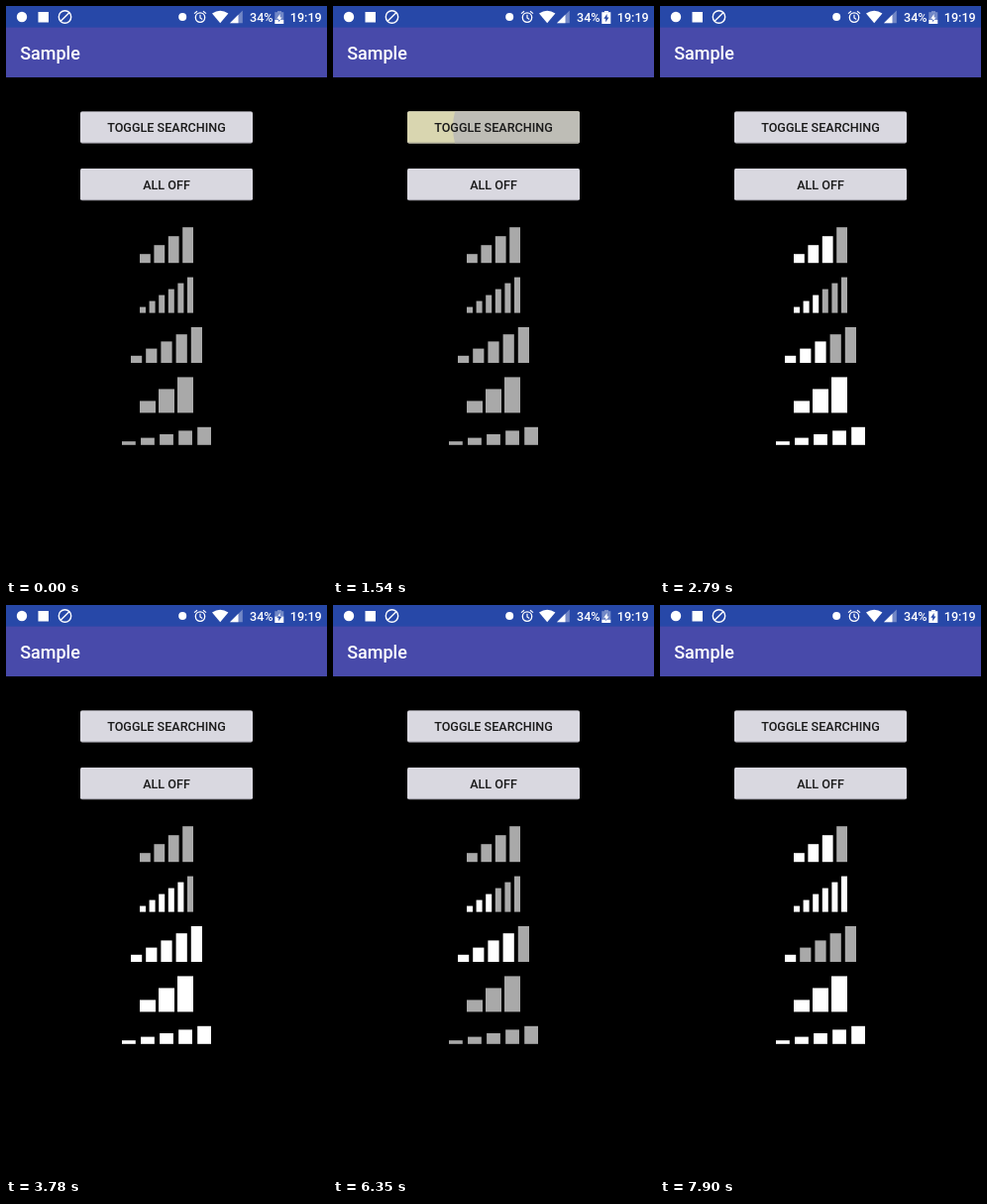
Write an HTML page with a canvas that moves like this. It is 324x576 px and loops after 8000 ms.

```html
<!DOCTYPE html>
<html lang="en">
<head>
<meta charset="utf-8">
<title>Sample</title>
<style>
  html, body { margin: 0; width: 100%; height: 100%; overflow: hidden; background: #000; }
  canvas { display: block; width: 324px; height: 576px; }
</style>
</head>
<body>
<canvas id="stage" width="324" height="576"></canvas>
<script>
const ctx = document.getElementById('stage').getContext('2d');
const LOOP = 8000;
const TICK = 512, FIRST_TICK = 1718;
const DIM = 'rgba(255,255,255,0.35)';

// x, top, width, height, bars, bar width, blinking
const METERS = [
  [135, 223.2, 54, 36, 4, 10.8, false],
  [135, 273.6, 54, 36, 6, 6, false],
  [126, 324, 72, 36, 5, 11.2, false],
  [135, 374.4, 54, 36, 3, 16, true],
  [117, 424.8, 90, 18, 5, 13.8, true]
];

// time, charge level
const CHARGE = [
  [0, .3], [170, .45], [690, .6], [1160, 1], [1720, 0], [2230, .15],
  [2750, .3], [3260, .4], [3780, .5], [4290, .58], [4590, 1], [5110, 0],
  [5660, .12], [6180, .25], [6690, .45], [7210, .6], [7720, 1]
];

const clamp = v => Math.max(0, Math.min(1, v));
const ramp = (t, a, b) => clamp((t - a) / (b - a));

function rect(x, y, w, h, fill) {
  ctx.fillStyle = fill;
  ctx.fillRect(x, y, w, h);
}

function poly(points, fill) {
  ctx.beginPath();
  points.forEach(([x, y]) => ctx.lineTo(x, y));
  ctx.closePath();
  ctx.fillStyle = fill;
  ctx.fill();
}

function disc(x, y, r, fill) {
  ctx.beginPath();
  ctx.arc(x, y, r, 0, Math.PI * 2);
  ctx.fillStyle = fill;
  ctx.fill();
}

function lines(width, ...paths) {
  ctx.beginPath();
  for (const path of paths) path.forEach(([x, y], i) => i ? ctx.lineTo(x, y) : ctx.moveTo(x, y));
  ctx.lineWidth = width;
  ctx.strokeStyle = '#fff';
  ctx.stroke();
}

function ring(x, y, r, width) {
  ctx.beginPath();
  ctx.arc(x, y, r, 0, Math.PI * 2);
  ctx.lineWidth = width;
  ctx.strokeStyle = '#fff';
  ctx.stroke();
}

function label(text, x, y, size, color, align = 'left') {
  ctx.font = `500 ${size}px Roboto, "Noto Sans", sans-serif`;
  ctx.textAlign = align;
  ctx.fillStyle = color;
  ctx.fillText(text, x, y);
}

function battery(t) {
  const level = CHARGE.filter(([at]) => at <= t).pop()[1];
  const top = 18 - 13 * level;
  const shell = fill => {
    rect(274, 5, 4, 1.5, fill);
    rect(271.3, 6.2, 9, 11.8, fill);
  };
  const bolt = fill => poly([[276.6, 8], [273.3, 12.8], [275.2, 12.8], [275.2, 16.2], [278.5, 11.4], [276.6, 11.4]], fill);
  const band = (y, h, draw) => {
    ctx.save();
    ctx.beginPath();
    ctx.rect(270, y, 12, h);
    ctx.clip();
    draw();
    ctx.restore();
  };
  band(4, top - 4, () => { shell(DIM); bolt('#fff'); });
  band(top, 18 - top, () => { shell('#fff'); bolt('#2748a8'); });
}

function statusBar(t) {
  rect(0, 0, 324, 21.6, '#2748a8');
  disc(16, 11, 5.2, '#fff');
  rect(32.5, 6, 10.5, 10.5, '#fff');

  ring(59.5, 11, 6.2, 1.4);
  lines(1.4, [[55.2, 15.3], [63.8, 6.7]]);

  disc(178.2, 11, 4, '#fff');

  ring(196, 11.6, 4.7, 1.3);
  lines(1.2, [[196, 8.8], [196, 12], [198.2, 13.4]], [[190, 7.6], [193, 5.2]], [[199, 5.2], [202, 7.6]]);

  ctx.beginPath();
  ctx.moveTo(216.2, 17.2);
  ctx.lineTo(208, 7.6);
  ctx.quadraticCurveTo(216.2, 2, 224.4, 7.6);
  ctx.closePath();
  ctx.fillStyle = '#fff';
  ctx.fill();

  poly([[226, 17.2], [238.8, 4.6], [238.8, 17.2]], DIM);
  poly([[226, 17.2], [234.5, 8.8], [234.5, 17.2]], '#fff');

  label('34%', 246, 15.6, 12.6, '#fff');
  battery(t);
  label('19:19', 286.8, 15.6, 12.6, '#fff');
}

function ripple(t) {
  const fade = 1 - ramp(t, 1690, 1940);
  const press = ramp(t, 1180, 1400) * fade;
  if (!press) return;
  ctx.globalAlpha = press;
  rect(75, 106, 174, 33, '#d9d6b0');
  const grow = ramp(t, 1330, 1800);
  ctx.globalAlpha = ramp(t, 1330, 1420) * fade;
  disc(196 - 22 * grow, 122.5, 145 * grow, '#bebdb6');
  ctx.globalAlpha = 1;
}

function button(text, y, overlay) {
  ctx.save();
  ctx.beginPath();
  ctx.roundRect(75, y, 174, 32.4, 2);
  ctx.clip();
  rect(75, y, 174, 33, '#d9d8e0');
  if (overlay) overlay();
  rect(75, y + 31.4, 174, 1, 'rgba(90,90,100,0.45)');
  ctx.restore();
  label(text, 162, y + 20.8, 12.6, '#1a1a1a', 'center');
}

function meter([x, y, w, h, n, barW, blinks], step) {
  const lit = blinks ? (step % 2) * n : step % (n + 1);
  const pitch = (w - barW) / (n - 1);
  for (let i = 0; i < n; i++) {
    const barH = h * (i + 1) / n;
    rect(x + i * pitch, y + h - barH, barW, barH, i < lit ? '#fff' : '#a9a9a9');
  }
}

function draw(t) {
  rect(0, 0, 324, 576, '#000');
  rect(0, 0, 324, 72, '#484aaa');
  statusBar(t);
  label('Sample', 14.2, 53.6, 18, '#fff');
  button('TOGGLE SEARCHING', 106.2, () => ripple(t));
  button('ALL OFF', 163.8);
  const step = Math.max(0, Math.floor((t - FIRST_TICK) / TICK) + 1);
  METERS.forEach(m => meter(m, step));
}

const start = performance.now();
function frame() {
  draw((performance.now() - start) % LOOP);
  requestAnimationFrame(frame);
}
frame();
</script>
</body>
</html>
```
